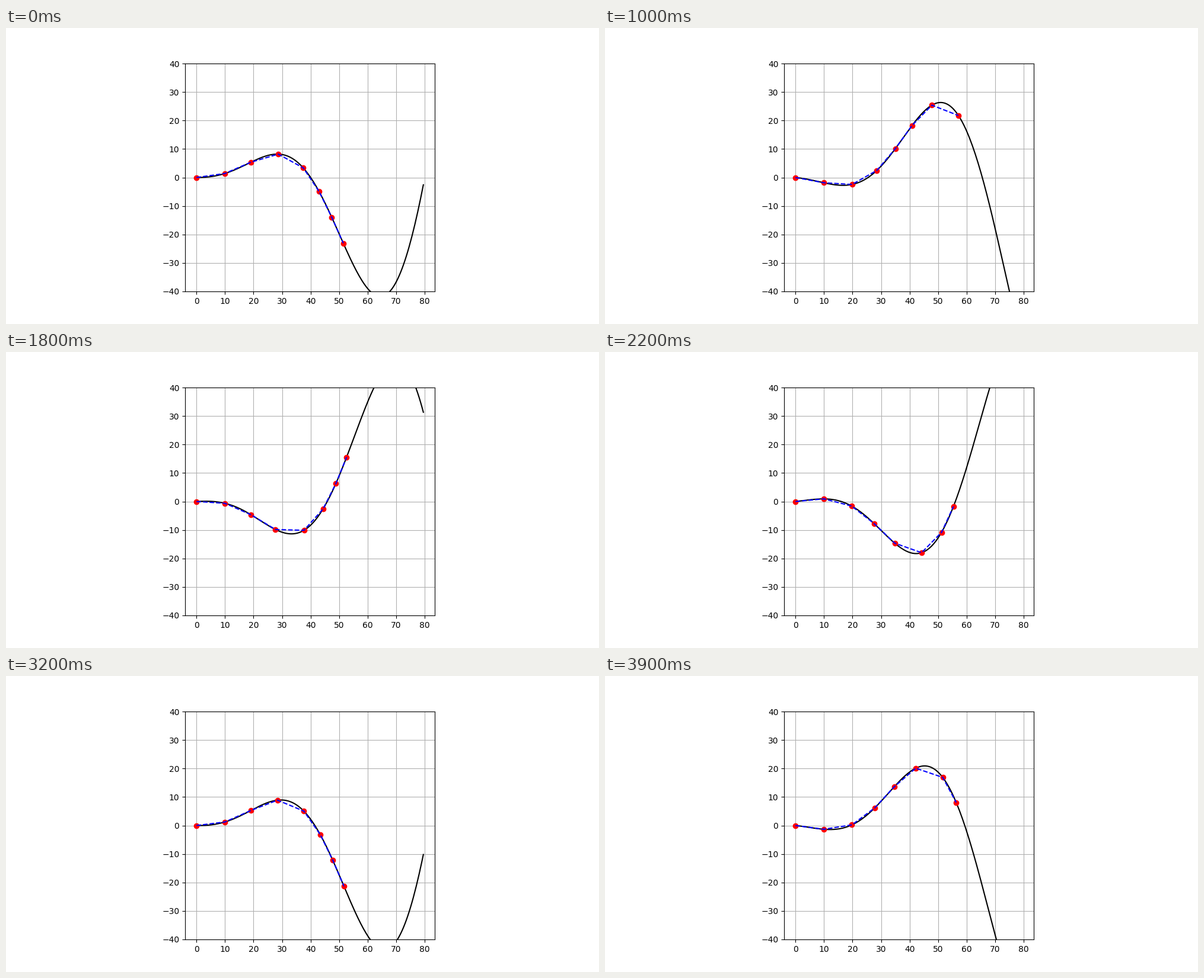
These frames come from a looping animation (1000 px wide and 500 px high, 4000 ms). A matplotlib script:

```python
import numpy as np
import matplotlib.pyplot as plt
from matplotlib.animation import FuncAnimation

FRAMES, INTERVAL = 40, 100   # 4 s loop
OMEGA = 2.0                  # rad/s
WAVELENGTH = 80.0
C1, C2 = 0.11, 0.009         # linear and quadratic envelope terms
LINK, LINKS = 10.0, 7


def wave(x, t):
    """Travelling body wave whose amplitude grows along x."""
    return (C1 * x + C2 * x**2) * np.sin(2 * np.pi * x / WAVELENGTH - OMEGA * t)


def next_joint(x0, t):
    """Find the point on the wave one link length ahead, by bisection."""
    y0 = wave(x0, t)
    low, high = x0, x0 + LINK
    for _ in range(40):
        mid = (low + high) / 2
        if np.hypot(mid - x0, wave(mid, t) - y0) < LINK:
            low = mid
        else:
            high = mid
    return (low + high) / 2


def chain(t):
    xs = [0.0]
    for _ in range(LINKS):
        xs.append(next_joint(xs[-1], t))
    xs = np.array(xs)
    return xs, wave(xs, t)


body_x = np.arange(0, 80, 0.5)

fig, ax = plt.subplots(figsize=(10, 5), dpi=100)
ax.set_aspect("equal")
ax.set_xlim(-3.975, 83.475)
ax.set_ylim(-40, 40)
ax.set_xticks(range(0, 81, 10))
ax.set_yticks(range(-40, 41, 10))
ax.grid(True)

body, = ax.plot([], [], "k-", lw=1.5)
joints, = ax.plot([], [], "ro", ms=6)
links, = ax.plot([], [], "b--", lw=1.5)


def update(frame):
    t = frame * INTERVAL / 1000
    body.set_data(body_x, wave(body_x, t))
    points = chain(t)
    joints.set_data(*points)
    links.set_data(*points)
    return body, joints, links


anim = FuncAnimation(fig, update, frames=FRAMES, interval=INTERVAL,
                     repeat=True, repeat_delay=0)
plt.show()
```
